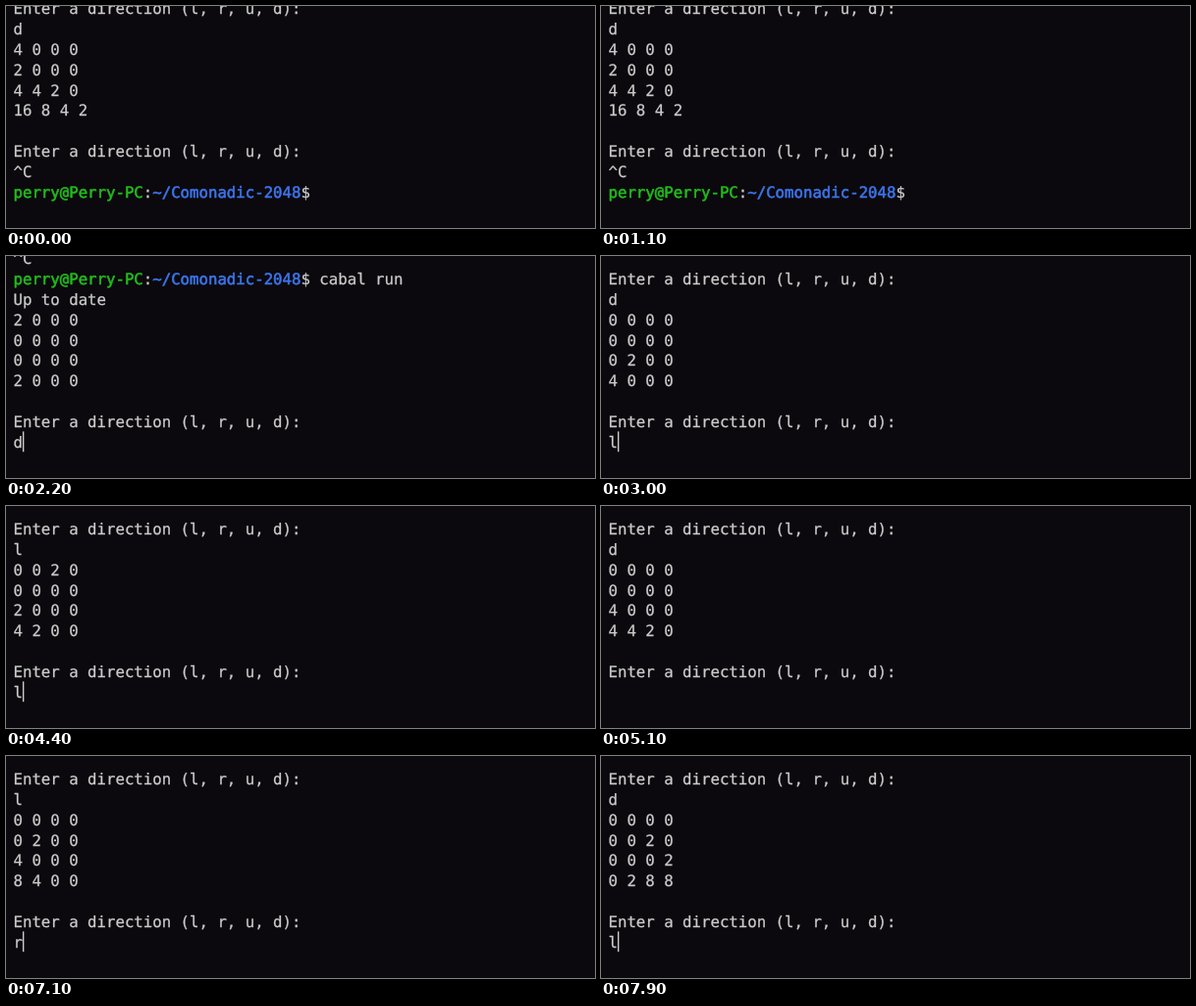
Animation of 600x227 px, one loop 8 s. Source, as an HTML page with a canvas:

```html
<!DOCTYPE html>
<html lang="en">
<head>
<meta charset="utf-8">
<title>Terminal game</title>
<style>
  html, body { margin: 0; width: 100%; height: 100%; overflow: hidden; background: #0b090d; }
  canvas { display: block; width: 600px; height: 227px; }
</style>
</head>
<body>
<canvas id="stage"></canvas>
<script>
const W = 600, H = 227, LOOP = 8000, STEP = 100;
const COL = 9.45, ROW = 20.8, LEFT = 7.5, TOP = -7.8, BASE = 16.1, ROWS = 10;
const BLINK = 280;
const BG = '#0b090d', FG = '#cccccc', GREEN = '#22ba1c', BLUE = '#3c74ea';
const ASK = 'Enter a direction (l, r, u, d):';
const PROMPT = [['perry@Perry-PC', GREEN], [':', FG], ['~/Comonadic-2048', BLUE], ['$ ', FG]];
const RECALL = 1300, RUN = 1600;

// key down, return pressed, direction, row and column of the new tile
const MOVES = [
  [2200, 2400, 'd', 2, 1],
  [3000, 3100, 'l', 3, 1],
  [3500, 3600, 'l', 0, 2],
  [4400, 4500, 'l', 2, 1],
  [4700, 4800, 'd', 3, 2],
  [5400, 5500, 'l', 3, 2],
  [5900, 6000, 'l', 1, 1],
  [7100, 7200, 'r', 3, 1],
  [7500, 7500, 'd', 1, 2],
  [7900, LOOP, 'l', 0, 0]
];

const plain = text => [[text, FG]];
const show = board => board.map(row => plain(row.join(' ')));

const CELL = {
  l: (i, k) => [i, k],
  r: (i, k) => [i, 3 - k],
  u: (i, k) => [k, i],
  d: (i, k) => [3 - k, i]
};

function squash(line) {
  const tiles = line.filter(Boolean), out = [];
  while (tiles.length) {
    const v = tiles.shift();
    out.push(tiles[0] === v ? v + tiles.shift() : v);
  }
  while (out.length < 4) out.push(0);
  return out;
}

function slide(board, dir) {
  const next = board.map(row => row.slice());
  for (let i = 0; i < 4; i++) {
    const cells = [0, 1, 2, 3].map(k => CELL[dir](i, k));
    squash(cells.map(([r, c]) => board[r][c])).forEach((v, k) => {
      const [r, c] = cells[k];
      next[r][c] = v;
    });
  }
  return next;
}

// Terminal contents at time t; the last line holds the cursor.
function terminal(t) {
  const lines = [
    ASK, 'd', '4 0 0 0', '2 0 0 0', '4 4 2 0', '16 8 4 2', '', ASK, '^C'
  ].map(plain);
  let touched = -310;
  if (t < RECALL) return { lines: [...lines, PROMPT], touched };

  lines.push([...PROMPT, ['cabal run', FG]]);
  if (t < RUN) return { lines, touched: RECALL };

  let board = [[2, 0, 0, 0], [0, 0, 0, 0], [0, 0, 0, 0], [2, 0, 0, 0]];
  let input = '';
  const ask = () => lines.push(...show(board), plain(''), plain(ASK));
  lines.push(plain('Up to date'));
  ask();
  touched = RUN;
  for (const [down, enter, dir, r, c] of MOVES) {
    if (t < down) break;
    touched = down;
    input = dir;
    if (t < enter) break;
    touched = enter;
    input = '';
    lines.push(plain(dir));
    board = slide(board, dir);
    board[r][c] = 2;
    ask();
  }
  lines.push(plain(input));
  return { lines, touched };
}

const canvas = document.getElementById('stage');
const ctx = canvas.getContext('2d');
const ratio = window.devicePixelRatio || 1;
canvas.width = W * ratio;
canvas.height = H * ratio;
ctx.scale(ratio, ratio);

// A thin outline thickens the strokes; coloured text is heavier.
function drawLine(spans, y) {
  let col = 0;
  for (const [text, color] of spans) {
    ctx.fillStyle = ctx.strokeStyle = color;
    ctx.lineWidth = color === FG ? 0.25 : 0.6;
    for (const ch of text) {
      const x = LEFT + COL * col++;
      ctx.fillText(ch, x, y);
      ctx.strokeText(ch, x, y);
    }
  }
  return col;
}

function draw(t) {
  const { lines, touched } = terminal(t);
  ctx.fillStyle = BG;
  ctx.fillRect(0, 0, W, H);
  ctx.font = '15.75px "DejaVu Sans Mono", "Noto Sans Mono", monospace';
  ctx.textBaseline = 'alphabetic';
  ctx.textRendering = 'geometricPrecision';
  ctx.lineJoin = 'round';
  let end = 0;
  lines.slice(-ROWS).forEach((spans, i) => {
    end = drawLine(spans, TOP + ROW * i + BASE);
  });
  if (Math.floor((t - touched) / BLINK) % 2 === 0) {
    ctx.fillStyle = FG;
    ctx.fillRect(LEFT + COL * end, TOP + ROW * (ROWS - 1), 1.4, ROW);
  }
}

const start = performance.now();
function tick() {
  const t = (performance.now() - start) % LOOP;
  draw(Math.floor(t / STEP) * STEP);
  requestAnimationFrame(tick);
}
tick();
</script>
</body>
</html>
```
